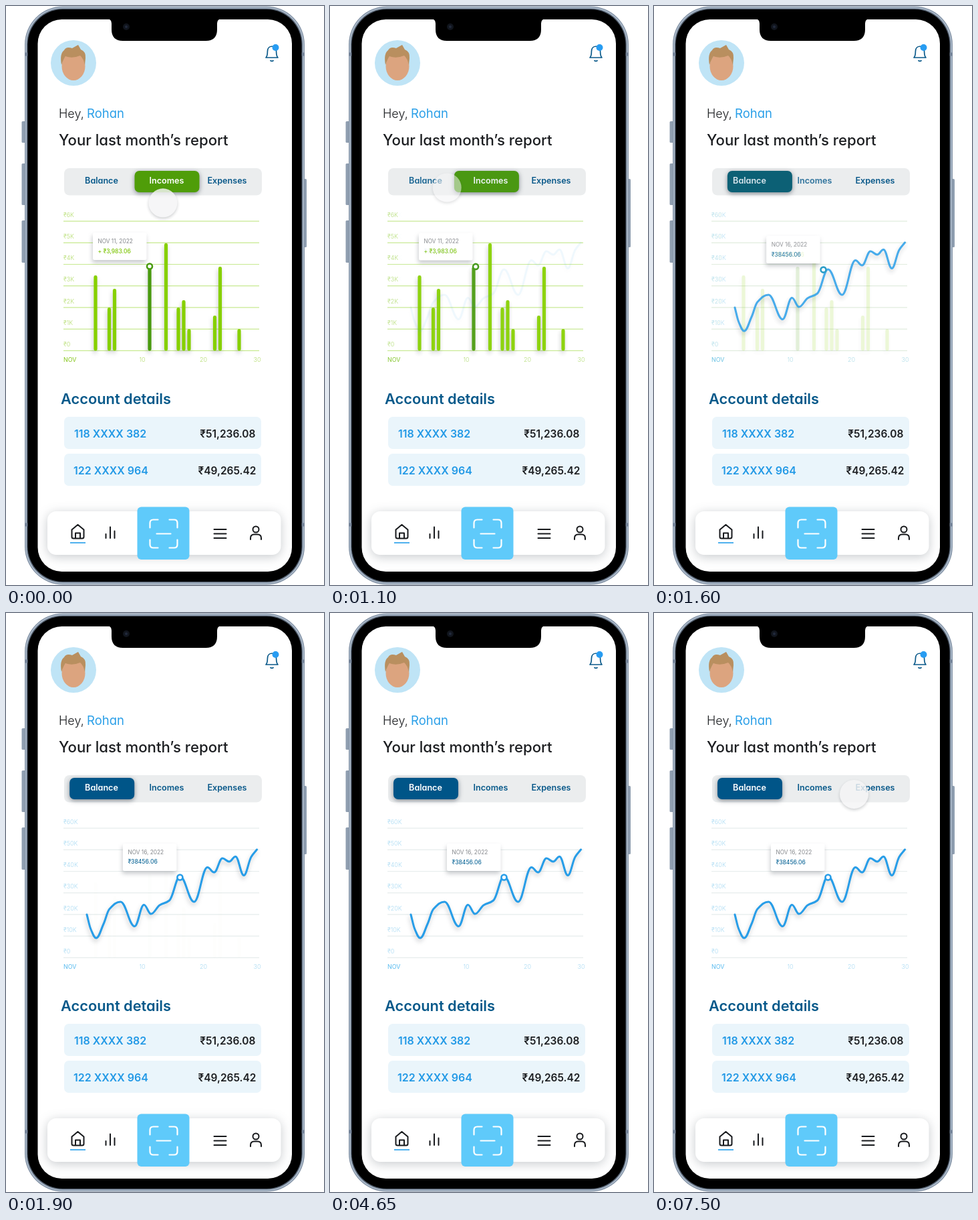
These frames come from a looping animation (476x864 px, 7.55 s). An HTML page:

```html
<!DOCTYPE html>
<html lang="en">
<head>
<meta charset="utf-8">
<title>Monthly report</title>
<style>
  html, body { margin: 0; width: 100%; height: 100%; overflow: hidden; background: #fff; }
  svg { display: block; width: 476px; height: 864px; }
  text { font-family: Inter, Lato, sans-serif; font-feature-settings: "cv11"; }
  .tab { font-size: 12.6px; font-weight: 600; text-anchor: middle; }
  .axis { font-size: 9px; font-weight: 300; }
  .date { font-size: 8.3px; fill: #85888c; }
  .sum { font-size: 8.5px; font-weight: 500; }
  .acct { font-size: 16px; font-weight: 600; fill: #2299e6; }
  .money { font-size: 15.5px; font-weight: 600; fill: #1c1e21; text-anchor: end; }
  .icon { fill: none; stroke: #17191c; stroke-width: 2; stroke-linecap: round; stroke-linejoin: round; }
  .soft { filter: drop-shadow(-1px 4px 3px rgba(60, 70, 80, .28)); }
  .raised { filter: drop-shadow(0 2px 3.5px rgba(30, 40, 55, .5)); }
</style>
</head>
<body>
<svg viewBox="0 0 476 864">
  <!-- phone -->
  <g fill="#8f9eb0">
    <rect x="23.500" y="172" width="6" height="32" rx="1.5"/>
    <rect x="23.500" y="235" width="6" height="62" rx="1.5"/>
    <rect x="23.500" y="320" width="6" height="63" rx="1.5"/>
    <rect x="444" y="258" width="6" height="102" rx="1.5"/>
  </g>
  <rect x="28" y="0.500" width="419" height="863" rx="57" fill="#8796a9"/>
  <rect x="29.500" y="2" width="416" height="860" rx="55.500" fill="#b4c2d1"/>
  <rect x="31" y="3.500" width="413" height="857" rx="54" fill="#5c697a"/>
  <path d="M28 72h5M442 72h5M28 774h5M442 774h5" stroke="#76859a" stroke-width="5"/>
  <rect x="32.500" y="5" width="410" height="854" rx="52.500"/>
  <rect x="47.500" y="20" width="380.500" height="824" rx="36" fill="#fff"/>
  <path d="M152 19Q158 20 158 26V35Q158 52 175 52H299Q316 52 316 35V26Q316 20 322 19Z"/>
  <circle cx="180" cy="31" r="5" fill="#11151d"/><circle cx="180" cy="31" r="2" fill="#222a3b"/>

  <!-- header -->
  <circle cx="101" cy="85" r="34" fill="#bfe4f6"/>
  <ellipse cx="101" cy="90" rx="17.500" ry="21" fill="#dca47f"/>
  <path d="M83 88Q80 71 87 66Q90 60 99 63L108 58L112 65Q120 68 119 78L118 88Q116 78 111 74Q99 79 89 75Q86 79 83 88Z" fill="#b98f5f"/>
  <path class="icon" d="M389 77C392 74 391 70 391.500 67C392 58 404 58 404.500 67C405 70 404 74 407 77ZM396 81.500Q398 83 400 81.500" style="stroke:#0b5a8a;stroke-width:1.7"/>
  <circle cx="403.500" cy="62" r="5" fill="#279cf2"/>
  <text x="79" y="167" font-size="18" font-weight="300" fill="#1c1e21">Hey,</text>
  <text x="121" y="167" font-size="18.500" fill="#2a9fe8">Rohan</text>
  <text x="79" y="208" font-size="22.200" font-weight="500" fill="#1c1e21">Your last month’s report</text>

  <!-- tabs -->
  <rect x="87" y="242" width="296" height="40.500" rx="8" fill="#ebedee"/>
  <rect id="pill" class="raised" y="246" width="97" height="32" rx="7"/>
  <text id="tabA" class="tab" x="143" y="265">Balance</text>
  <text id="tabB" class="tab" x="240.500" y="265">Incomes</text>
  <text class="tab" x="331" y="265" fill="#0a598a">Expenses</text>

  <!-- chart -->
  <g id="grid" stroke-width="1.200"></g>
  <g id="incomes"></g>
  <g id="balance"></g>
  <g id="tip">
    <rect class="soft" x="130" y="338" width="80.500" height="41" rx="2.500" fill="#fff"/>
    <g id="tipB">
      <text class="date" x="137.500" y="354">NOV 11, 2022</text>
      <text class="sum" x="137.500" y="368.500" fill="#7cc404">+ ₹3,983.06</text>
    </g>
    <g id="tipA">
      <text class="date" x="137.500" y="354">NOV 16, 2022</text>
      <text class="sum" x="137.500" y="368.500" fill="#176d9c">₹38456.06</text>
    </g>
  </g>
  <circle id="ring" r="4" fill="#fff" stroke-width="2.600"/>

  <!-- accounts -->
  <text x="82" y="594" font-size="21.800" font-weight="600" fill="#07598a">Account details</text>
  <rect x="87" y="613" width="295" height="48" rx="7" fill="#eaf5fb"/>
  <rect x="87" y="668" width="295" height="48" rx="7" fill="#eaf5fb"/>
  <text class="acct" x="102" y="644">118 XXXX 382</text>
  <text class="money" x="373.500" y="644">₹51,236.08</text>
  <text class="acct" x="101" y="698.500">122 XXXX 964</text>
  <text class="money" x="374.500" y="698.500">₹49,265.42</text>

  <!-- navigation -->
  <rect x="62" y="754" width="349.500" height="65" rx="13" fill="#fff" style="filter:drop-shadow(0 3px 8px rgba(40,50,60,.26))"/>
  <rect x="196.500" y="747.500" width="78" height="78.500" rx="6" fill="#5fcafa"/>
  <path class="icon" transform="translate(.5 .5)" d="M215 778V771Q215 766 220 766H227M244 766H251Q256 766 256 771V778M256 796V803Q256 808 251 808H244M227 808H220Q215 808 215 803V796M225 787H246" style="stroke:#fff;stroke-width:2.200"/>
  <path class="icon" d="M98.500 781.500L107.500 774L116.500 781.500V792Q116.500 794.500 114 794.500H101Q98.500 794.500 98.500 792ZM104 794V786.500H111V794"/>
  <path d="M96 801H119" stroke="#3ba9ee" stroke-width="1.800"/>
  <path class="icon" d="M149.500 788V794M156 777.500V794M162.500 783.500V794M311.500 781H329.500M311.500 787.500H329.500M311.500 794H329.500"/>
  <path class="icon" d="M366 796V794Q366 788.500 371.500 788.500H376.500Q382 788.500 382 794V796"/>
  <circle class="icon" cx="374" cy="781" r="4.500"/>

  <circle id="touch" r="21.500" fill="#f5f5f6" style="filter:drop-shadow(0 2px 2px rgba(40,45,55,.28))"/>
</svg>
<script>
const LOOP = 7550, STEP = 50, SWITCH = 1070, GLIDE = 870, RETURN = 7160;
const NAVY = [7, 89, 138], WHITE = [255, 255, 255];
const $ = id => document.getElementById(id);
const clamp = v => Math.max(0, Math.min(1, v));
const mix = (a, b, p) => a + (b - a) * p;
const tint = (a, b, p) => `rgb(${a.map((v, i) => Math.round(mix(v, b[i], p)))})`;
const easeOut = v => 1 - (1 - clamp(v)) ** 2;
const glide = (t, start) => easeOut((t - start) / GLIDE);

function buildAxis(unit, soft, strong) {
  let out = "";
  for (let i = 0; i < 7; i++) {
    const label = i ? "₹" + i + unit : "₹0";
    out += `<text class="axis" x="86" y="${508 - i * 32.2}" fill="${soft}">${label}</text>`;
  }
  [[10, 204], [20, 295.5], [30, 376]].forEach(([day, x]) => {
    out += `<text class="axis" x="${x}" y="531" text-anchor="middle" fill="${soft}">${day}</text>`;
  });
  return out + `<text class="axis" x="86" y="531" fill="${strong}" style="font-weight:400">NOV</text>`;
}

function buildBars() {
  const bars = [[134, 402], [154.5, 450], [162.5, 422], [215, 389], [239.5, 354], [258, 450],
    [266, 439], [274, 482], [312.5, 462], [320.5, 389], [349, 482]];
  return `<g class="soft">` + bars.map(([x, y]) =>
    `<rect x="${x - 2.6}" y="${y}" width="5.2" height="${514.5 - y}" rx="2.4" fill="${x === 215 ? "#499a0e" : "#86d000"}"/>`
  ).join("") + `</g>`;
}

// Smooth path whose peaks and dips have level tangents
function smooth(pts) {
  const slope = i => (pts[i + 1][1] - pts[i][1]) / (pts[i + 1][0] - pts[i][0]);
  const last = pts.length - 1;
  const tan = pts.map((_, i) => {
    if (!i) return slope(0);
    if (i === last) return slope(last - 1);
    const a = slope(i - 1), b = slope(i);
    return a * b <= 0 ? 0 : 2 * a * b / (a + b);
  });
  let d = "M" + pts[0];
  for (let i = 0; i < last; i++) {
    const [x, y] = pts[i], [u, v] = pts[i + 1], k = (u - x) * .39;
    d += `C${x + k} ${y + k * tan[i]} ${u - k} ${v - k * tan[i + 1]} ${u} ${v}`;
  }
  return d;
}

const trend = [[121, 450], [127, 472], [135, 485], [146, 464], [155, 441.5], [171.5, 431], [192.5, 467.5],
  [206.5, 435.5], [217, 449], [230, 436], [244.5, 429], [260.5, 393], [281.5, 431], [301.5, 379.5],
  [311.5, 387], [324, 366], [334, 371], [343.5, 363.5], [356, 391.5], [367, 364], [375.5, 353]];

for (let i = 0; i < 7; i++) {
  const y = 514.3 - i * 32.2;
  $("grid").innerHTML += `<path d="M86 ${y}H379"/>`;
}
$("incomes").innerHTML = buildAxis("K", "#b3dc6c", "#86c61c") + buildBars();
$("balance").innerHTML = buildAxis("0K", "#a9daf3", "#5bbcf0") +
  `<path class="soft" d="${smooth(trend)}" fill="none" stroke="#279de8" stroke-width="3" stroke-linecap="round"/>`;

function moveTouch(t) {
  let from, to, p, alpha = .82;
  if (t < SWITCH) {
    from = [563, 409]; to = [147, 263]; p = glide(t, -470);
    alpha = mix(.82, .45, clamp((t - 300) / 250));
  } else if (t < RETURN) {
    from = [147, 263]; to = [563, 380]; p = glide(t, SWITCH);
    alpha = mix(.45, .82, clamp((t - SWITCH) / 150));
  } else {
    from = [563, 310]; to = [144, 247]; p = glide(t, RETURN);
  }
  const touch = $("touch");
  touch.setAttribute("cx", mix(from[0], to[0], p));
  touch.setAttribute("cy", mix(from[1], to[1], p));
  touch.setAttribute("opacity", alpha);
}

function draw(time) {
  const t = Math.floor(time % LOOP / STEP) * STEP;
  const p = glide(t, SWITCH);
  $("pill").setAttribute("x", mix(192.5, 95, p));
  $("pill").setAttribute("fill", tint([79, 157, 9], [0, 85, 136], p));
  $("tabA").setAttribute("fill", tint(NAVY, WHITE, p));
  $("tabB").setAttribute("fill", tint(WHITE, NAVY, p));
  $("grid").setAttribute("stroke", tint([199, 233, 144], [230, 236, 236], p));
  for (const id of ["incomes", "tipB"]) $(id).setAttribute("opacity", 1 - p);
  for (const id of ["balance", "tipA"]) $(id).setAttribute("opacity", p);
  $("tip").setAttribute("transform", `translate(${45 * p} ${6 * p})`);
  $("ring").setAttribute("cx", mix(215, 260.5, p));
  $("ring").setAttribute("cy", mix(388.5, 394.5, p));
  $("ring").setAttribute("stroke", tint([73, 154, 14], [39, 157, 232], p));
  moveTouch(t);
}

const begin = performance.now();
function tick() {
  draw(performance.now() - begin);
  requestAnimationFrame(tick);
}
tick();
</script>
</body>
</html>
```
